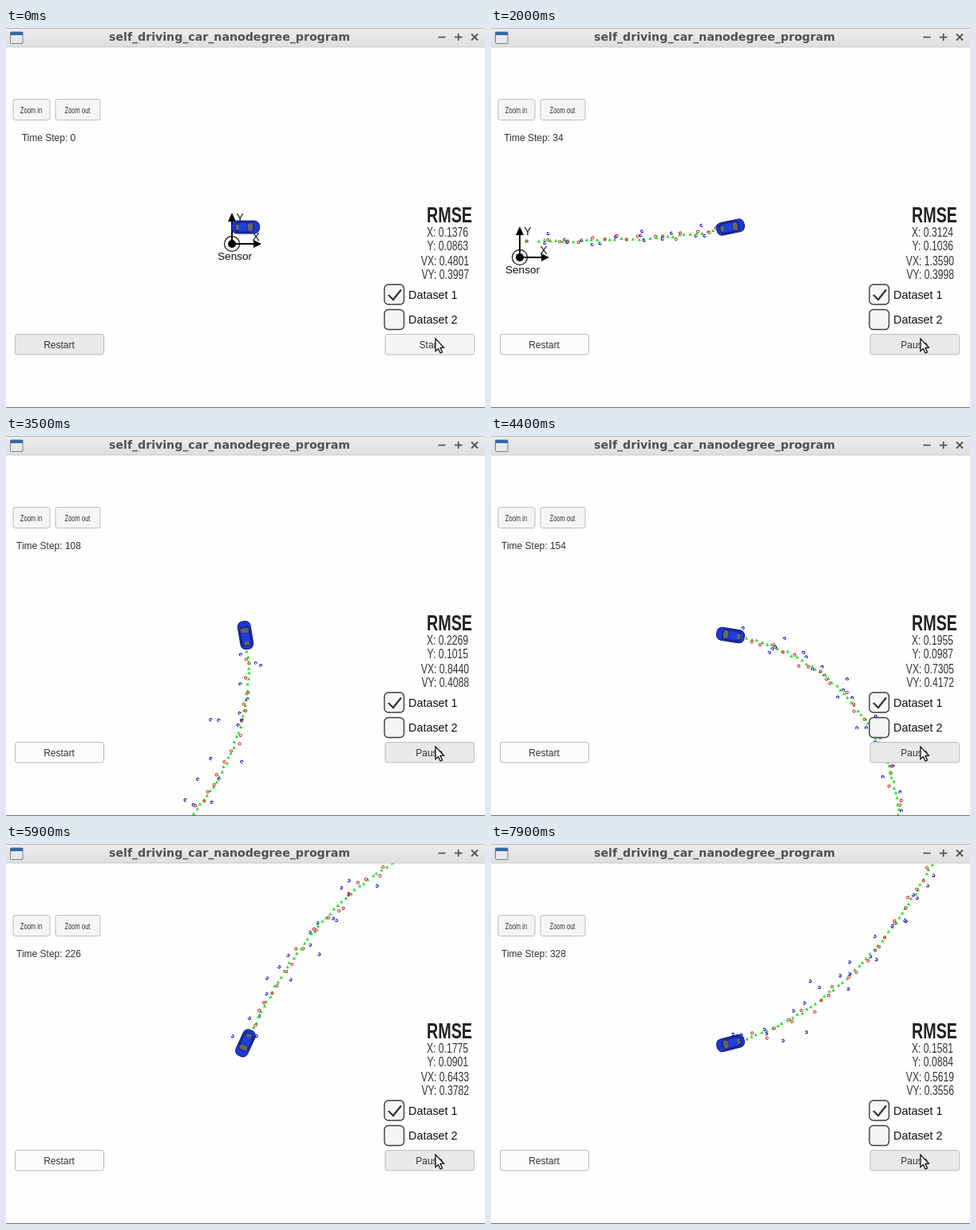
Recreate the animation shown at these times as an HTML page with a canvas. Size 600 px wide and 477 px high, loop 8 s.

```html
<!DOCTYPE html>
<html lang="en">
<head>
<meta charset="utf-8">
<title>Sensor fusion simulator</title>
<style>
  html, body { margin: 0; width: 100%; height: 100%; overflow: hidden; background: #fefefe; }
  canvas { display: block; }
</style>
</head>
<body>
<canvas id="stage" width="600" height="477"></canvas>
<script>
const ctx = document.getElementById('stage').getContext('2d');
const SANS = '"Liberation Sans", Arial, sans-serif';
const LOOP = 8000, SCALE = 28.2, DT = 0.05, CAR = { x: 300, y: 250 };

// time in ms, time step, then RMSE of X, Y, VX, VY
const KEYS = [
  [1400, 4, 0.6303, 0.0263, 3.6860, 0.5063],
  [2700, 68, 0.2786, 0.1068, 1.0316, 0.3917],
  [4400, 154, 0.1955, 0.0987, 0.7305, 0.4172],
  [5900, 226, 0.1775, 0.0901, 0.6433, 0.3782],
  [6800, 273, 0.1647, 0.0854, 0.5931, 0.3503],
  [7900, 328, 0.1581, 0.0884, 0.5619, 0.3556]
];
const OLD_RMSE = [0.1376, 0.0863, 0.4801, 0.3997];

let seed = 20;
function random() {
  seed = (seed * 1664525 + 1013904223) % 4294967296;
  return (seed + 1) / 4294967297;
}
const gauss = sd => sd * Math.sqrt(-2 * Math.log(random())) * Math.cos(2 * Math.PI * random());

// Figure-eight drive: yaw rate and speed are sinusoids of the step.
function drive(count) {
  const rows = [];
  let x = 0.6, y = 0.6, yaw = 0;
  for (let k = 1; k <= count; k++) {
    const range = Math.hypot(x, y) + gauss(0.3), angle = Math.atan2(y, x) + gauss(0.03);
    const laser = k % 2 === 1;
    const seen = laser
      ? { x: x + gauss(0.12), y: y + gauss(0.12) }
      : { x: range * Math.cos(angle), y: range * Math.sin(angle) };
    const guess = { x: x + gauss(0.025), y: y + gauss(0.025) };
    if (k === 1) Object.assign(guess, Object.assign(seen, { x: 0.31, y: 0.58 }));
    rows.push({ x, y, yaw, laser, seen, guess });
    const turn = 0.55 * Math.sin(2 * Math.PI * k / 500) * DT;
    const dist = (5 + 0.2 * Math.cos(4 * Math.PI * k / 500)) * DT;
    x += dist * Math.cos(yaw + turn / 2);
    y += dist * Math.sin(yaw + turn / 2);
    yaw += turn;
  }
  return rows;
}
const rows = drive(340);

function stepAt(t) {
  if (t < 1400) return 0;
  const i = Math.max(1, KEYS.findIndex(k => k[0] >= t));
  const [a, b] = [KEYS[i - 1], KEYS[i]];
  return Math.round(a[1] + (b[1] - a[1]) * (t - a[0]) / (b[0] - a[0]));
}

// Squared error sums grow evenly between the known values.
function rmseAt(step) {
  if (!step) return OLD_RMSE;
  const i = Math.max(1, KEYS.findIndex(k => k[1] >= step));
  const [a, b] = [KEYS[i - 1], KEYS[i]];
  const f = (step - a[1]) / (b[1] - a[1]);
  return OLD_RMSE.map((_, j) => {
    const sum = k => k[j + 2] ** 2 * k[1];
    return Math.sqrt((sum(a) + (sum(b) - sum(a)) * f) / step);
  });
}

function text(str, x, y, size, { align = 'center', color = '#333', narrow = 1, weight = '', font = SANS } = {}) {
  ctx.save();
  ctx.translate(x, y);
  ctx.scale(narrow, 1);
  ctx.font = `${weight} ${size}px ${font}`;
  ctx.textAlign = align;
  ctx.fillStyle = color;
  ctx.fillText(str, 0, 0);
  ctx.restore();
}

function box(x, y, w, h, r, fill, stroke, width = 1) {
  ctx.beginPath();
  ctx.roundRect(x, y, w, h, r);
  ctx.fillStyle = fill;
  ctx.fill();
  if (!stroke) return;
  ctx.strokeStyle = stroke;
  ctx.lineWidth = width;
  ctx.stroke();
}

function line(points, color, width) {
  ctx.beginPath();
  points.forEach(p => ctx.lineTo(...p));
  ctx.strokeStyle = color;
  ctx.lineWidth = width;
  ctx.stroke();
}

function shape(points, fill) {
  ctx.beginPath();
  points.forEach(p => ctx.lineTo(...p));
  ctx.closePath();
  ctx.fillStyle = fill;
  ctx.fill();
}

function ring(x, y, r, color, width, start = 0, end = 2 * Math.PI) {
  ctx.beginPath();
  ctx.arc(x, y, r, start, end);
  ctx.strokeStyle = color;
  ctx.lineWidth = width;
  ctx.stroke();
}

function drawSensor(x, y) {
  ctx.save();
  ctx.translate(x, y);
  line([[0, 0], [0, -30]], '#000', 2);
  line([[0, 0], [28, 0]], '#000', 2);
  shape([[-5, -28], [0, -39], [5, -28]], '#000');
  shape([[27, -5], [37, 0], [27, 5]], '#000');
  ring(0, 0, 9.5, '#111', 1.2);
  ctx.beginPath();
  ctx.arc(0, 0, 5, 0, 7);
  ctx.fill();
  text('Y', 10, -28, 14, { color: '#111' });
  text('X', 30, -4, 14, { color: '#111' });
  text('Sensor', 3.5, 20, 13.6, { color: '#111' });
  ctx.restore();
}

function drawTrail(step, car) {
  const place = p => [CAR.x + (p.x - car.x) * SCALE, CAR.y - (p.y - car.y) * SCALE];
  for (const row of rows.slice(0, step + 1)) {
    const [gx, gy] = place(row.guess), [mx, my] = place(row.seen);
    shape([[gx - 2.2, gy + 1.8], [gx, gy - 2.2], [gx + 2.2, gy + 1.8]], '#34dc34');
    if (row.laser) ring(mx, my, 1.6, '#d03434', 1.1);
    else ring(mx, my, 1.5, '#2020c4', 1.2, row.yaw, row.yaw + 5.3);
  }
}

function drawCar(yaw) {
  ctx.save();
  ctx.translate(CAR.x, CAR.y);
  ctx.rotate(-yaw);
  box(-17.5, -8, 35, 16, 6.5, '#1c36d8', '#14206e');
  box(-13, -6.5, 23, 13, 4, '#1a2cae', '#101c60', 0.8);
  box(-9, -5, 11, 10, 2, '#2040de');
  shape([[-12.5, -3.5], [-8.5, -3], [-8.5, 3], [-12.5, 3.5]], '#66685a');
  shape([[3, -4], [8, -5.5], [9.5, 0], [8, 5.5], [3, 4]], '#66685a');
  ctx.restore();
}

function button(label, x, y, w, h, fill, size = 12, narrow = 1) {
  box(x - 0.5, y - 0.5, w, h, 2.5, fill, '#bdbdbd');
  text(label, x + w / 2 - 1, y + h / 2 + size * 0.36, size, { narrow });
}

function drawPanel(t, step) {
  const pressed = t >= 700;
  button('Zoom in', 9.5, 90, 46, 26, '#f5f5f5', 10.5, 0.72);
  button('Zoom out', 62.5, 90, 56, 26, '#f5f5f5', 10.5, 0.72);
  text(`Time Step: ${step}`, 53.5, 142, 12);
  text('RMSE', 555.5, 243.5, 27, { weight: 'bold', narrow: 0.73, color: '#222' });
  rmseAt(step).forEach((value, i) =>
    text(`${['X', 'Y', 'VX', 'VY'][i]}: ${value.toFixed(4)}`, i < 2 ? 579 : 580, [262, 279, 298, 315][i], 16,
      { align: 'right', narrow: 0.76 }));
  for (const [i, y] of [322, 353.5].entries()) {
    box(474, y, 24.5, 25, 5, '#f5f5f5', '#3c3c3c', 1.4);
    text(`Dataset ${i + 1}`, 504, y + 17.5, 14.4, { align: 'left', color: '#111' });
  }
  line([[479, 335], [485, 341], [495, 328.5]], '#333', 2.2);
  button('Restart', 12, 385, 111, 25.5, pressed ? '#fbfbfb' : '#e9e9e9');
  button(t >= 1000 ? 'Pause' : 'Start', 475.5, 385, 111.5, 25.5, pressed ? '#e9e9e9' : '#f5f5f5');
}

function drawCursor() {
  shape([[538, 390], [538, 405.5], [541.5, 402.5], [544, 408], [546.5, 407], [544, 401.5], [548.5, 401]], '#fff');
  ctx.strokeStyle = '#111';
  ctx.lineWidth = 1.3;
  ctx.stroke();
}

function drawWindow() {
  const bar = ctx.createLinearGradient(0, 0, 0, 24);
  bar.addColorStop(0, '#ededed');
  bar.addColorStop(1, '#dedede');
  ctx.fillStyle = bar;
  ctx.fillRect(0, 0, 600, 24);
  ctx.fillStyle = '#b8b8b8';
  ctx.fillRect(0, 0, 600, 1);
  ctx.fillStyle = '#d0d0d0';
  ctx.fillRect(0, 23.5, 600, 1);
  ctx.fillStyle = '#777';
  ctx.fillRect(0, 476, 600, 1);
  box(5.5, 5, 15.5, 14.5, 1, '#e4e8ec', '#74808c');
  ctx.fillStyle = '#3567a8';
  ctx.fillRect(5.5, 5, 15.5, 4);
  text('self_driving_car_nanodegree_program', 280, 16.2, 14.15,
    { weight: 'bold', font: '"DejaVu Sans", sans-serif', color: '#505050' });
  const ink = '#555';
  line([[541.5, 11.5], [550.5, 11.5]], ink, 1.8);
  line([[562, 11.5], [571.5, 11.5]], ink, 1.8);
  line([[566.7, 7], [566.7, 16]], ink, 1.8);
  line([[583, 7.5], [591, 15.5]], ink, 1.8);
  line([[591, 7.5], [583, 15.5]], ink, 1.8);
}

function draw(now) {
  const t = Math.floor(now % LOOP / 100) * 100;
  const step = stepAt(t), car = rows[step];
  ctx.fillStyle = '#fefefe';
  ctx.fillRect(0, 0, 600, 477);
  drawSensor(CAR.x - car.x * SCALE, CAR.y + car.y * SCALE + 4);
  if (step) drawTrail(step, car);
  drawCar(car.yaw);
  drawPanel(t, step);
  drawCursor();
  drawWindow();
}

let start;
function tick(now) {
  start ??= now;
  draw(now - start);
  requestAnimationFrame(tick);
}
requestAnimationFrame(tick);
</script>
</body>
</html>
```
